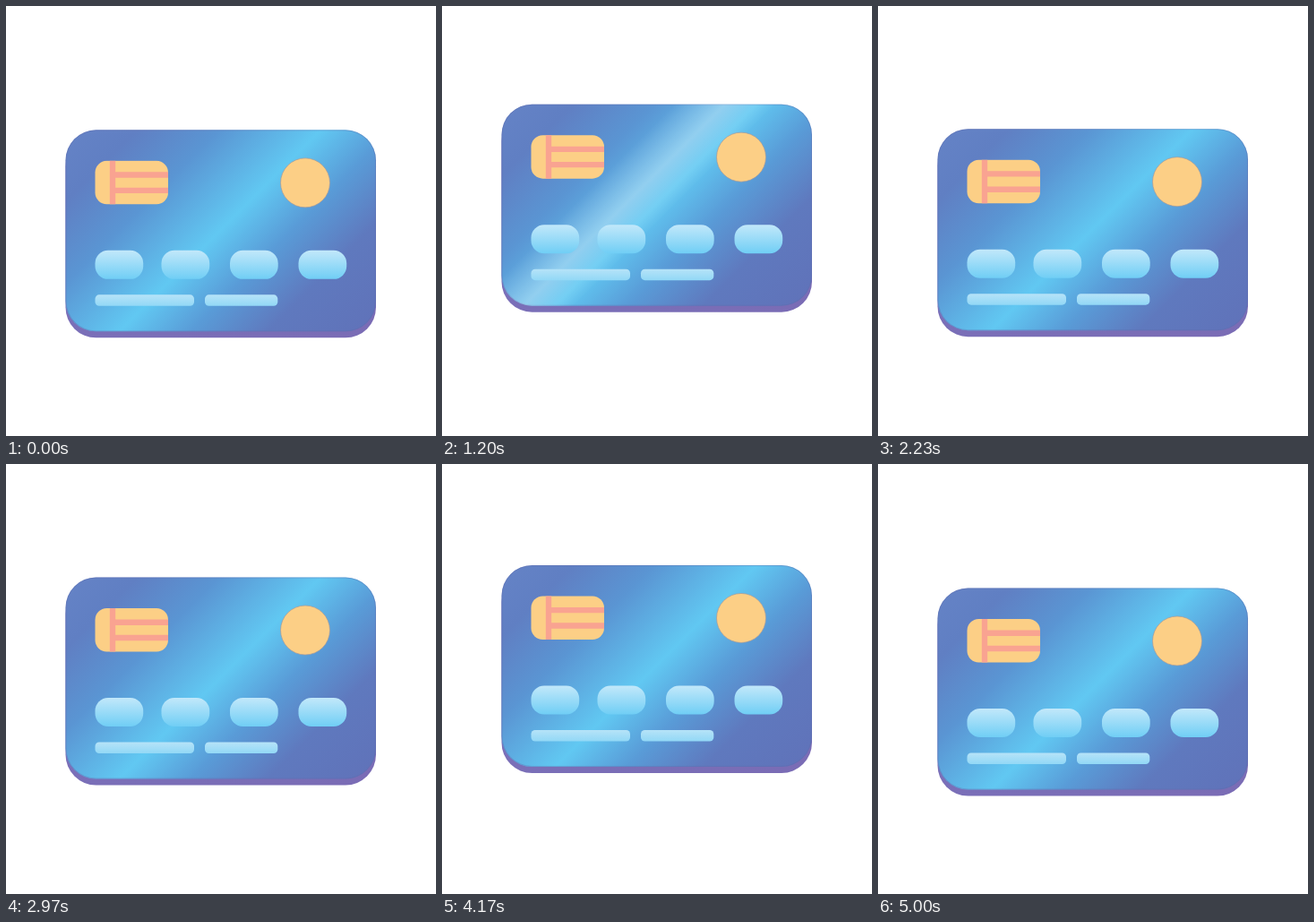
These frames come from a looping animation (480 by 480 pixels, 5060 ms). An HTML page:

```html
<!DOCTYPE html>
<html lang="en">
<head>
<meta charset="utf-8">
<title>Floating card</title>
<style>
  html, body { margin: 0; width: 100%; height: 100%; overflow: hidden; background: #fff; }
  svg { display: block; width: 100vw; height: 100vh; }
</style>
</head>
<body>
<svg viewBox="0 0 480 480">
  <defs>
    <linearGradient id="face" gradientUnits="userSpaceOnUse" x1="97" y1="107.5" x2="382" y2="392.5">
      <stop offset="0" stop-color="#6583c6"/>
      <stop offset=".14" stop-color="#607fc3"/>
      <stop offset=".3" stop-color="#5a95d3"/>
      <stop offset=".5" stop-color="#61c8f2"/>
      <stop offset=".64" stop-color="#599bd7"/>
      <stop offset=".79" stop-color="#5f79be"/>
      <stop offset="1" stop-color="#6072b9"/>
    </linearGradient>
    <linearGradient id="side" x2="1" y2="0">
      <stop offset="0" stop-color="#7a6fb8"/>
      <stop offset="1" stop-color="#7a6cb5"/>
    </linearGradient>
    <linearGradient id="glass" x2="0" y2="1">
      <stop offset="0" stop-color="#c2e8fa"/>
      <stop offset="1" stop-color="#70cef5"/>
    </linearGradient>
    <linearGradient id="line" x2="0" y2="1">
      <stop offset="0" stop-color="#b6e3f8"/>
      <stop offset="1" stop-color="#92d8f6"/>
    </linearGradient>
    <linearGradient id="glow">
      <stop offset="0" stop-color="#fff" stop-opacity="0"/>
      <stop offset=".5" stop-color="#fff" stop-opacity=".32"/>
      <stop offset="1" stop-color="#fff" stop-opacity="0"/>
    </linearGradient>
    <clipPath id="faceClip"><rect x="66.5" y="138" width="346.5" height="225" rx="34"/></clipPath>
    <clipPath id="chipClip"><rect x="99.5" y="172.5" width="81.5" height="48.5" rx="13"/></clipPath>
  </defs>

  <g id="card">
    <rect x="66.5" y="145" width="346.5" height="225" rx="34" fill="url(#side)"/>
    <rect x="66.5" y="138" width="346.5" height="225" rx="34" fill="url(#face)"/>
    <rect x="67" y="138.5" width="345.5" height="224" rx="33.5" fill="none" stroke="#6067a8" stroke-opacity=".45" stroke-width=".8"/>
    <g clip-path="url(#faceClip)">
      <g transform="translate(66.5 138) rotate(45)">
        <rect id="shine" x="-40" y="-400" width="80" height="800" fill="url(#glow)"/>
      </g>
    </g>

    <g clip-path="url(#chipClip)">
      <rect x="99" y="172" width="83" height="50" fill="#fccf86"/>
      <path d="M119 172v50M119 188.2h63M119 205.5h63" stroke="#f9a391" stroke-width="6.4"/>
    </g>

    <circle cx="334" cy="197" r="27.5" fill="#fccf86" stroke="#a59a9a" stroke-width=".7"/>

    <g fill="url(#glass)">
      <rect x="99.5" y="272.5" width="53.7" height="32" rx="14.5"/>
      <rect x="173.5" y="272.5" width="53.7" height="32" rx="14.5"/>
      <rect x="250" y="272.5" width="53.7" height="32" rx="14.5"/>
      <rect x="326.5" y="272.5" width="53.7" height="32" rx="14.5"/>
    </g>
    <g fill="url(#line)">
      <rect x="99.5" y="322" width="110.5" height="12.5" rx="4.5"/>
      <rect x="222" y="322" width="81.3" height="12.5" rx="4.5"/>
    </g>
  </g>
</svg>
<script>
  const CYCLE = 2530;
  const RISE = 28, OVER = 2;
  const UP = [220, 740], DOWN = [1530, 2075];
  const card = document.getElementById('card');
  const shine = document.getElementById('shine');

  const ease = p => (1 - Math.cos(Math.PI * p)) / 2;
  const part = (t, [a, b]) => (t - a) / (b - a);
  // Ringing after an overshoot: halves and flips every half swing
  const ring = t => OVER * Math.cos(Math.PI * t / 210) * Math.pow(0.5, t / 205);

  function lift(t) {
    if (t < UP[0]) return ring(t + CYCLE - DOWN[1]);
    if (t < UP[1]) return -(RISE + OVER) * ease(part(t, UP));
    if (t < DOWN[0]) return -RISE - ring(t - UP[1]);
    if (t < DOWN[1]) return -RISE + (RISE + OVER) * ease(part(t, DOWN));
    return ring(t - DOWN[1]);
  }

  function draw(now) {
    const t = now % CYCLE;
    card.setAttribute('transform', `translate(0 ${lift(t).toFixed(3)})`);
    const p = part(t, [950, 1530]);
    shine.setAttribute('visibility', p > 0 && p < 1 ? 'visible' : 'hidden');
    shine.setAttribute('transform', `translate(${(-40 + 500 * p).toFixed(2)} 0)`);
  }

  const start = performance.now();
  function tick() {
    draw(performance.now() - start);
    requestAnimationFrame(tick);
  }
  tick();
</script>
</body>
</html>
```
